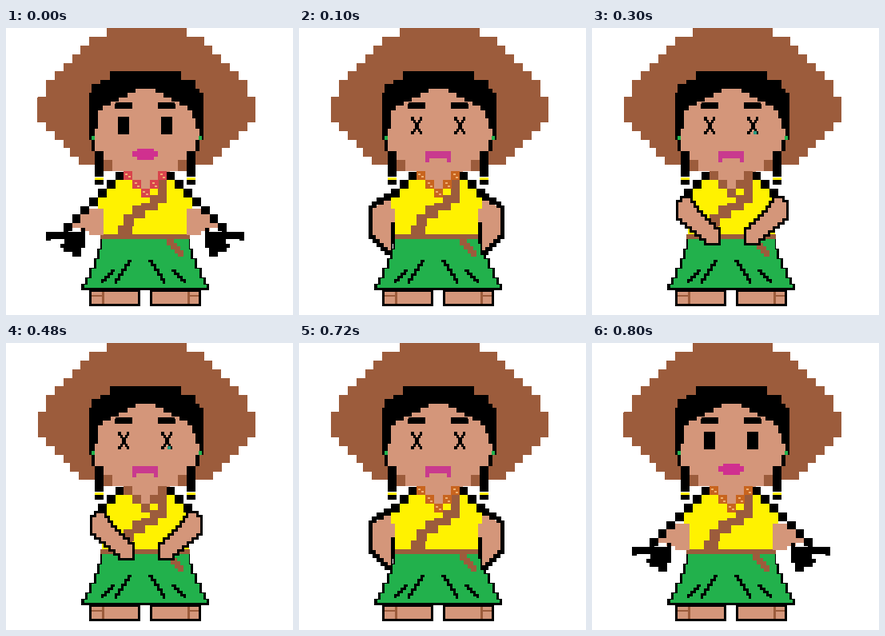
Write an HTML page that moves like this. It is 359 px wide and 359 px high and loops after 900 ms.

```html
<!DOCTYPE html>
<html lang="en">
<head>
<meta charset="utf-8">
<title>Pixel dancer</title>
<style>
html, body { margin: 0; width: 100%; height: 100%; overflow: hidden; background: #fff; }
svg { display: block; width: 359px; height: 359px; shape-rendering: crispEdges; }
.hat { fill: #9c5c3c; }
.skin { fill: #d4967a; }
.lip { fill: #d0308f; }
.frown { fill: #c93a8e; }
.top { fill: #fff200; }
.skirt { fill: #22b14c; }
.line { fill: none; stroke: #000; stroke-width: 3; }
.limb { fill: #d4967a; stroke: #000; stroke-width: 3; }
.pose { animation: 900ms step-end infinite; }
.open { animation-name: open; }
.shut { animation-name: shut; }
.down { animation-name: down; }
.fold { animation-name: fold; }
.bead { animation-name: bead; }
.speck { animation-name: speck; fill: #f0b070; }
@keyframes open { 0%, 88.8889% { opacity: 1 } 11.1111% { opacity: 0 } }
@keyframes shut { 0%, 88.8889% { opacity: 0 } 11.1111% { opacity: 1 } }
@keyframes down { 0%, 33.3333%, 88.8889% { opacity: 0 } 11.1111%, 66.6667% { opacity: 1 } }
@keyframes fold { 0%, 66.6667% { opacity: 0 } 33.3333% { opacity: 1 } }
@keyframes bead { 0% { fill: #d9444c } 11.1111%, 66.6667% { fill: #c8641e } 33.3333% { fill: #9c5c3c } }
@keyframes speck { 0%, 66.6667% { opacity: 1 } 33.3333% { opacity: 0 } }
</style>
</head>
<body>
<svg viewBox="0 0 359 359">
  <defs>
    <g id="aim">
      <path class="skin" d="M115 226h7v33h-18v-5h-11v-4h-10v-6h10v-11h11v-7z"/>
      <path d="M104 212h11v11h-11zM93 223h11v10h-11zM83 233h10v11h-10zM72 244h11v10h-11zM50 255h22v-6h6v6h16v-5h5v25h-5v11h-11v-6h-11v-5h-4v-5h5v-6h-17v2h-6z"/>
    </g>
    <g id="hang">
      <path class="skin" d="M115 213H106V218H99V222H90V262H95V267H100V272H105V277H110V282H115V260H120V226H115Z"/>
      <path d="M115 207H106V212H97V217H91V222H87V264H92V269H97V274H102V279H107V284H117V270H120V243H115V278H111V274H106V269H101V264H96V259H92V225H97V221H106V216H115Z"/>
    </g>
    <path id="cross" class="limb" d="M124.500 211.500H111.500V216.500H106.500V239.500H111.500V244.500H117.500V249.500H123.500V254.500H129.500V259.500H135.500V264.500H141.500V270.500H159.500V250.500H153.500V244.500H147.500V239.500H142.500V234.500H137.500V229.500H132.500V223.500H128.500V217.500H124.500Z"/>
    <path id="eye" d="M140 111h4v4h2v3h3v-3h2v-4h3v5h-2v3h-2v7h2v3h2v4h-3v-3h-2v-3h-3v3h-2v3h-4v-4h3v-3h2v-7h-2v-3h-3z"/>
    <path id="leg" class="limb" d="M105.500 328.500h61v18h-61z"/>
  </defs>

  <path class="hat" d="M126 0H226V11H248V22H258V33H269V44H280V54H291V65H302V86H312V118H302V129H291V140H280V150H270V161H259V171H226V179H122V171H91V161H80V150H72V140H61V129H50V118H40V86H50V65H61V54H72V44H83V33H93V22H104V11H126Z"/>
  <path d="M130 54H219V65H237V76H242V81H247V140H242V154H237V186H226V140H122V186H111V154H107V140H104V81H107V70H118V65H130ZM111 190h11v6h-11zM226 190h11v6h-11z"/>
  <path class="top" d="M111 187h11v3h-11zM226 187h11v3h-11z"/>
  <path fill="#fff" d="M122 179h15v11h-15zM211 179h15v11h-15z"/>
  <path class="skin" d="M162 76H187V81H197V87H207V92H217V97H227V103H233V113H237V126H242V140H237V154H226V165H215V179H205V190H147V179H133V165H122V154H111V126H115V103H121V97H131V92H141V87H152V81H162Z"/>
  <path class="skirt" d="M107 135h4v5h-4zM241 135h4v5h-4z"/>
  <path d="M137 93h21v8h-22v-6h1zM190 93h21v2h1v6h-22z"/>

  <path class="top" d="M126 190H222V201H233V226H229V260H120V226H115V201H126Z"/>
  <path class="skin" d="M147 180H201V190H190V201H180V212H169V201H158V190H147Z"/>
  <path d="M137 180h10v10h-10zM126 190h11v11h-11zM115 201h11v11h-11zM201 180h10v10h-10zM211 190h11v11h-11zM222 201h11v11h-11z"/>
  <path class="hat" d="M190 190H201V219H190V228H174V238H160V248H158V258H140V247H147V233H158V222H169V219H180V209H190Z"/>

  <path d="M118 264H230V276H234V288H239V300H245V312H250V320H254V328H94V320H99V312H104V300H110V288H114V276H118Z"/>
  <path class="skirt" d="M120 264H229V277H231V289H236V301H242V313H247V321H251V325H98V321H102V313H107V301H113V289H117V277H120Z"/>
  <path class="hat" d="M118 258H230V264H118ZM201 264h9v5h4v4h4v5h4v8h-7v-4h-4v-5h-5v-5h-5z"/>
  <path class="line" d="M136 303h-4v4h-4v4h-4v4h-4v4M157 291h-4v5h-4v6h-4v6h-4v6h-4v6M178 291h4v5h4v6h4v6h4v6h3v6M207 303h4v4h4v4h4v4h4v4"/>

  <use href="#leg"/>
  <use href="#leg" x="76"/>
  <path class="hat" d="M107 334h13v-4h3v15h-3v-9h-13zM241 334h-11v-4h-3v15h3v-9h11z"/>

  <path class="pose bead" d="M147 179h11v11h-11zM158 190h11v11h-11zM169 201h11v11h-11zM180 190h11v11h-11zM190 179h11v11h-11z"/>
  <path class="pose speck" d="M149 182h3v2h-3zM153 185h3v2h-3zM161 193h3v2h-3zM164 197h3v2h-3zM171 204h3v2h-3zM175 207h3v2h-3zM183 193h3v2h-3zM186 197h3v2h-3zM193 182h3v2h-3zM196 186h3v2h-3z"/>

  <g class="pose open">
    <path d="M140 111h14v22h-14zM194 111h14v22h-14z"/>
    <path class="lip" d="M164 151h21v3h5v7h-5v4h-21v-4h-6v-7h6z"/>
    <path class="hat" d="M39 87h1v31h-1z"/>
    <use href="#aim"/>
    <use href="#aim" transform="matrix(-1 0 0 1 348 0)"/>
  </g>

  <g class="pose shut">
    <use href="#eye"/>
    <use href="#eye" x="54"/>
    <path class="frown" d="M158 154h32v14h-5v-5h-22v5h-5z"/>
  </g>

  <g class="pose down">
    <use href="#hang"/>
    <use href="#hang" transform="matrix(-1 0 0 1 344 0)"/>
  </g>

  <g class="pose fold">
    <use href="#cross"/>
    <use href="#cross" transform="matrix(-1 0 0 1 351 0)"/>
    <path fill="#2a9a80" d="M202 129h4v4h-4z"/>
  </g>
</svg>
</body>
</html>
```
